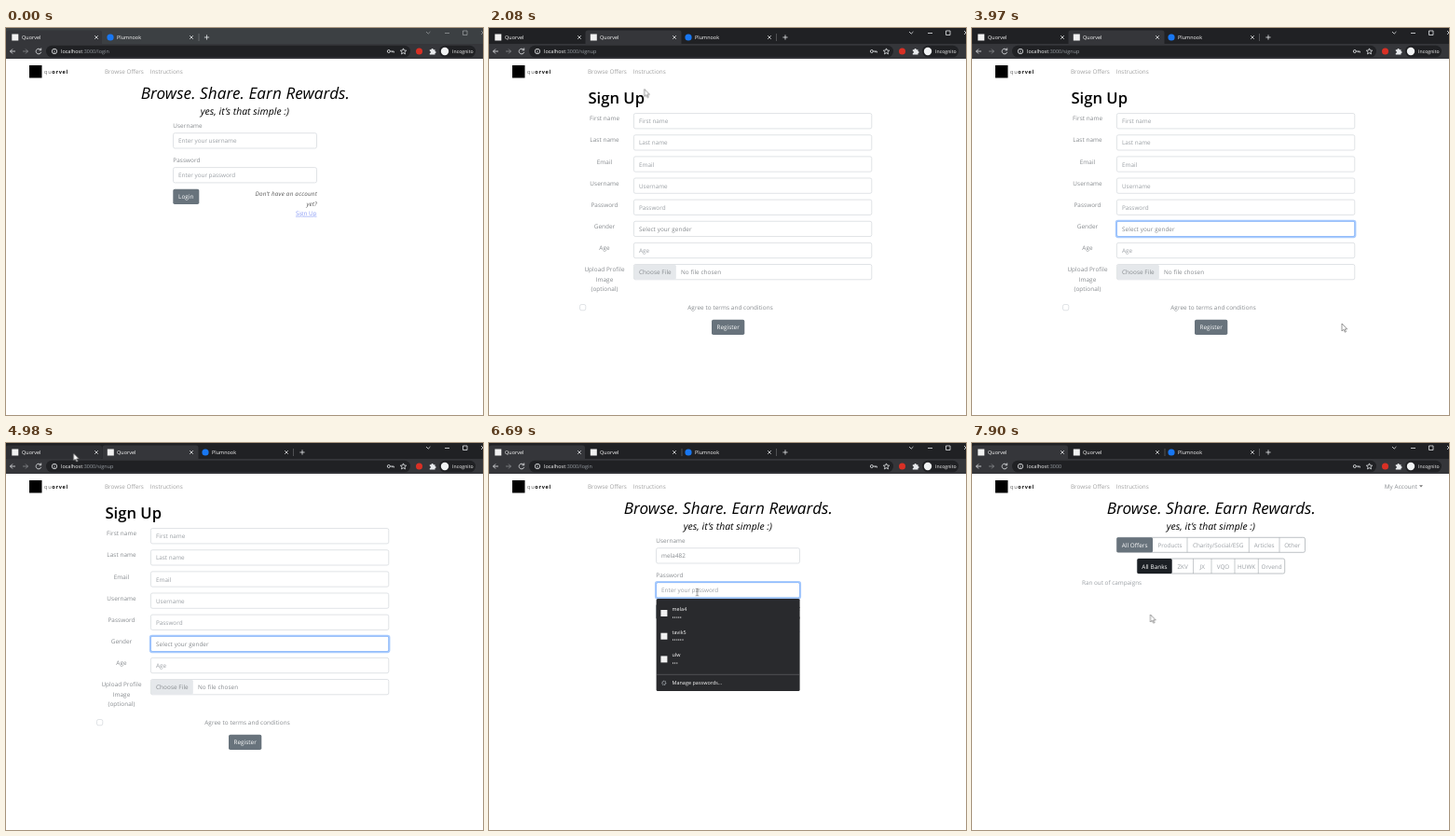
An HTML page that plays this animation: 512x415 px, repeating every 8000 ms.

```html
<!DOCTYPE html>
<html lang="en">
<head>
<meta charset="utf-8">
<title>Sign in walkthrough</title>
<style>
html,body{margin:0;width:100%;height:100%;overflow:hidden;background:#fff}
svg{display:block;width:512px;height:415px;font-family:"Open Sans","Noto Sans",sans-serif;font-size:6.35px;text-rendering:geometricPrecision}
text{white-space:pre}
.lab{fill:#85898d;letter-spacing:.08px}.ph{fill:#9a9fa4}.nav{fill:#a0a0a0}
.w{fill:#fff;font-weight:500;letter-spacing:.06px}
.ui{font-size:5.4px;fill:#fff;font-weight:500;letter-spacing:.06px}.dim{fill:#9aa0a6}
.mid{text-anchor:middle}.end{text-anchor:end}
.it{font-style:italic}
.ask{fill:#555;letter-spacing:.2px}
.h1{font-size:17.1px;font-weight:500;fill:#000;letter-spacing:.1px}
.h2{font-size:10.4px;font-weight:500;fill:#000;letter-spacing:.06px}
.title{font-size:16.6px;font-weight:600;fill:#000}
.box{fill:#fff;stroke:#d3d7db;stroke-width:.7}
.ring{fill:none;stroke:#a9cbfd;stroke-width:2}
.ring+rect{fill:none;stroke:#86b7fe;stroke-width:.7}
.line{fill:none;stroke:#e8eaed;stroke-width:.8}
.cur{fill:#fff;stroke:#555;stroke-width:.6;stroke-linejoin:round}
</style>
</head>
<body>
<svg id="stage" viewBox="0 0 512 415"></svg>
<script>
const LOOP = 8000;
const SITE = 'Quorvel', OTHER = 'Plumnook';

// Times in ms during which each group is shown
const shown = {
  idle: [[0, 910]],
  busy: [[910, 8000]],
  spin: [[910, 1780]],
  loaded: [[1780, 8000]],
  first: [[0, 1780], [5110, 8000]],
  second: [[1780, 5110]],
  tabhover: [[4900, 5110]],
  login: [[0, 1780], [5110, 7660]],
  signup: [[1780, 5110]],
  home: [[7660, 8000]],
  select: [[2860, 5110]],
  options: [[2940, 3470]],
  userfocus: [[5730, 6690]],
  userlist: [[5800, 6210]],
  userempty: [[0, 6210]],
  userfilled: [[6210, 8000]],
  passfocus: [[6690, 7660]],
  passlist: [[6690, 6900]],
  passempty: [[0, 6900]],
  passfilled: [[6900, 8000]],
  caret: [[6900, 7430]],
  press: [[7250, 7660]],
  arrow: [[0, 560], [1000, 1250], [1400, 2300], [2600, 5500], [7150, 7250], [7660, 8000]],
  hand: [[560, 1000], [1250, 1400], [7250, 7660]],
  beam: [[2300, 2600], [5500, 7150]]
};

// Pointer path: time, x, y
const path = [
  [0, 495, 418], [70, 492, 404], [240, 440, 325], [420, 355, 232], [600, 320, 197], [910, 320, 197],
  [1080, 262, 136], [1320, 161, 50], [1380, 160, 45], [1690, 151, 10], [1850, 151, 10],
  [2100, 168, 70], [2540, 204, 177], [2610, 203, 222], [2690, 200, 211.5], [3560, 200, 211.5],
  [3720, 262, 262], [3970, 397, 317], [4220, 397, 317], [4350, 421, 288], [4620, 260, 142],
  [4880, 80, 18], [4980, 72.5, 11], [5350, 72.5, 11], [5560, 209, 115], [6290, 209, 115],
  [6520, 223.5, 160], [7030, 223.5, 160], [7430, 191.5, 184], [8000, 191.5, 184]
];

const pct = t => +(t / LOOP * 100).toFixed(4) + '%';
let css = '';
for (const [name, spans] of Object.entries(shown)) {
  let keys = spans[0][0] ? '0%{opacity:0}' : '';
  for (const [a, b] of spans)
    keys += `${pct(a)}{opacity:1}` + (b < LOOP ? `${pct(b)}{opacity:0}` : '100%{opacity:1}');
  css += `@keyframes ${name}{${keys}}.${name}{animation:${name} ${LOOP}ms step-end infinite}`;
}
css += `@keyframes move{${path.map(([t, x, y]) => `${pct(t)}{transform:translate(${x}px,${y}px)}`).join('')}}`
  + `#pointer{animation:move ${LOOP}ms linear infinite}`;
document.head.appendChild(document.createElement('style')).textContent = css;

const text = (x, y, s, c = '', more = '') => `<text x="${x}" y="${y}" class="${c}" ${more}>${s}</text>`;
const rect = (x, y, w, h, fill, r = 0) => `<rect x="${x}" y="${y}" width="${w}" height="${h}" rx="${r}" fill="${fill}"/>`;
const line = (d, c = 'line', more = '') => `<path d="${d}" class="${c}" ${more}/>`;
const dot = (x, y, r, fill) => `<circle cx="${x}" cy="${y}" r="${r}" fill="${fill}"/>`;
const group = (c, ...parts) => `<g class="${c}">${parts.join('')}</g>`;
const frame = (x, y, w, h, c = 'box') => `<rect x="${x}" y="${y}" width="${w}" height="${h}" rx="1.8" class="${c}"/>`;
const ring = (x, y, w, h) => frame(x - .6, y - .6, w + 1.2, h + 1.2, 'ring') + frame(x, y, w, h, '');
const button = (x, y, w, label, fill = '#68737c') =>
  rect(x, y, w, 16.3, fill, 1.8) + text(x + w / 2, y + 10.6, label, 'w mid');

// Browser window
const cross = x => line(`M${x - 1.8} 8.2l3.6 3.6m0-3.6l-3.6 3.6`);
const plus = x => line(`M${x - 2.6} 10h5.2M${x} 7.4v5.2`);
const split = x => line(`M${x} 6v8`, 'line', 'opacity=".3"');
const tabShape = x => line(`M${x} 17.5V5q0-2.5 2.5-2.5h98q2.5 0 2.5 2.5v12.5z`, '', 'fill="#35363a"');
const tabLabel = (x, icon, name) => icon + text(x + 17, 12, name, 'ui') + cross(x + 97);
const favicon = (x, y) => rect(x, y, 7, 7, '#f1f1f1');
const siteTab = x => tabLabel(x, favicon(x + 6.3, 6.5), SITE);
const otherTab = x => tabLabel(x, dot(x + 10, 10, 3.6, '#1877f2'), OTHER);
const controls = alpha => `<g opacity="${alpha}">` +
  line('M451 4l2.2 2.2L455.4 4M471 5.5h5M490.5 3h4.5v4.5h-4.5zM510 3l4 4m0-4l-4 4') + '</g>';

const strip =
  group('idle', rect(0, 0, 512, 18, '#3c4043'), tabShape(0), siteTab(0), otherTab(102), split(207), plus(215.5), controls(.5)) +
  group('busy',
    rect(0, 0, 512, 18, '#202124'),
    group('first', tabShape(0), split(207)),
    group('tabhover', rect(0, 2.5, 103, 15, '#2e2f33', 2)),
    group('second', tabShape(103.5)),
    siteTab(0),
    group('spin', '<circle cx="112.5" cy="10" r="2.9" fill="none" stroke="#8ab4f8" stroke-width="1.1" stroke-dasharray="13 5"/>'),
    group('loaded', favicon(108.8, 6.5)),
    text(119, 12, SITE, 'ui'), cross(199),
    otherTab(204), split(308.5), plus(318), controls(1));

const toolbar =
  rect(0, 17, 512, 16, '#35363a') +
  line('M10 25H4.5m2.5-2.5L4.5 25l2.5 2.5') +
  line('M18 25h5.5m-2.5-2.5l2.5 2.5l-2.5 2.5', 'line', 'opacity=".45"') +
  line('M37.2 23.3a2.8 2.8 0 1 0 .5 2.5M37.7 21.5v2.3h-2.3') +
  rect(43, 18.7, 391, 12.6, '#202124', 6.3) +
  '<circle cx="52" cy="25" r="2.7" class="line"/>' + line('M52 24.6v2M52 23.2v.6') +
  '<circle cx="410.8" cy="25" r="1.5" class="line"/>' + line('M412.3 25h4v1.5m-1.6-1.5v1.2') +
  line('M426.5 21.9l.9 2.1 2.3.2-1.8 1.5.6 2.2-2-1.2-2 1.2.6-2.2-1.8-1.5 2.3-.2z') +
  dot(443.5, 25, 3.5, '#d93025') +
  line('M454.8 23.2h1.7a1.1 1.1 0 1 1 2.2 0h1.8v1.7a1.1 1.1 0 1 1 0 2.2v1.5h-5.7v-1.6a1.1 1.1 0 1 0 0-2.2z', '', 'fill="#e8eaed"') +
  rect(465, 18.7, 39, 12.6, '#202124', 6.3) + dot(471, 25, 4.2, '#f1f3f4') +
  text(479, 27, 'Incognito', 'ui', 'style="font-size:5.1px"');
const url = p => text(59, 27, `localhost<tspan class="dim">:3000${p}</tspan>`, 'ui');

// Shared page parts
const header =
  rect(25, 40, 13.5, 13.5, '#000') +
  text(41, 49, 'qu<tspan font-weight="700" fill="#111">orvel</tspan>', '', 'fill="#666" font-size="5.6" letter-spacing=".7"') +
  text(106, 48.7, 'Browse Offers', 'nav') + text(154.7, 48.7, 'Instructions', 'nav');
const slogan =
  text(256.8, 76, 'Browse. Share. Earn Rewards.', 'h1 it mid') +
  text(256.4, 93, 'yes, it’s that simple :)', 'h2 it mid');

// Saved accounts popup
const saved = y => `<g transform="translate(0 ${y})">` +
  rect(179.6, 0, 154, 99, '#292a2d', 1.5) +
  [['mela4', 5], ['tavik5', 6], ['ulw', 3]].map(([name, n], i) =>
    favicon(184.4, 12 + i * 24.7) + text(196.5, 13 + i * 24.7, name, 'ui') +
    text(196.5, 21.7 + i * 24.7, '•'.repeat(n), 'ui')).join('') +
  line('M180 81.3h153', 'line', 'opacity=".25"') +
  '<circle cx="187.8" cy="90.3" r="1.9" fill="none" stroke="#9aa0a6" stroke-width="1.3" stroke-dasharray="1 .5"/>' +
  text(196.5, 92.3, 'Manage passwords...', 'ui') + '</g>';

const login = group('login', url('/login'), slogan,
  text(179.3, 106.8, 'Username', 'lab'), frame(179.5, 112.7, 154, 16.3),
  text(179.3, 143.6, 'Password', 'lab'), frame(179.5, 149.6, 154, 16.3),
  group('userempty', text(185, 123.2, 'Enter your username', 'ph')),
  group('userfilled', text(185, 123.2, 'mela482', 'lab')),
  group('passempty', text(185, 160.1, 'Enter your password', 'ph')),
  group('passfilled', Array.from({length: 7}, (_, i) => dot(186 + i * 3.05, 157.7, 1, '#666')).join('')),
  button(179.3, 172.7, 28, 'Login'),
  group('press', button(179.3, 172.7, 28, 'Login', '#565e64')),
  text(334, 180.2, 'Don’t have an account', 'ask it end'),
  text(334, 190.5, 'yet?', 'ask it end'),
  text(333.5, 200.8, 'Sign Up', 'end', 'fill="#8b9cf5" text-decoration="underline"'),
  group('userfocus', ring(179.5, 112.7, 154, 16.3), line('M185.3 117.5v7', '', 'stroke="#555" stroke-width=".6"')),
  group('passfocus', ring(179.5, 149.6, 154, 16.3)),
  group('caret', line('M206.5 154v7', '', 'stroke="#777" stroke-width=".6"')),
  group('userlist', saved(130)), group('passlist', saved(167)));

const rowY = i => 91.6 + i * 23.13;
const fields = ['First name', 'Last name', 'Email', 'Username', 'Password', 'Gender', 'Age'];
const signup = group('signup', url('/signup'),
  text(106.5, 80.5, 'Sign Up', 'title'),
  ...fields.map((name, i) =>
    text(124, rowY(i) + 7.7, name, 'lab mid') + frame(155.4, rowY(i), 255.4, 16.3) +
    text(161, rowY(i) + 10.7, name === 'Gender' ? 'Select your gender' : name, name === 'Gender' ? 'lab' : 'ph')),
  ...['Upload Profile', 'Image', '(optional)'].map((s, i) => text(124, 261.3 + i * 10.2, s, 'lab mid')),
  frame(155.4, rowY(7), 255.4, 16.3), rect(155.8, rowY(7) + .4, 45, 15.5, '#e5e8eb', 1.4),
  text(161, 264.2, 'Choose File', 'lab'), text(206, 264.2, 'No file chosen', 'lab'),
  frame(97.5, 296.5, 6.3, 6.3), text(259, 302.3, 'Agree to terms and conditions', 'lab mid'),
  button(239, 312.8, 35.3, 'Register'),
  group('select', ring(155.4, rowY(5), 255.4, 16.3)),
  group('options',
    '<rect x="155.4" y="223.8" width="255.4" height="55.4" fill="#fff" stroke="#888" stroke-width=".7"/>',
    rect(155.7, 224.1, 254.8, 13.5, '#c5c5c5'),
    text(161, 233.6, 'Select your gender', 'w'),
    ...['Male', 'Female', 'Other'].map((s, i) => text(161, 247.6 + i * 13.7, s, 'lab'))));

// Joined buttons: edges, top, labels, colour
const bar = (xs, y, names, color) => {
  const x0 = xs[0], w = xs[xs.length - 1] - x0;
  return `<rect x="${x0}" y="${y}" width="${w}" height="16" rx="1.8" fill="#fff" stroke="#a3a8ad" stroke-width=".7"/>` +
    rect(x0, y, xs[1] - x0, 16, color, 1.5) +
    names.map((s, i) => (i > 1 ? line(`M${xs[i]} ${y}v16`, '', 'stroke="#a3a8ad" stroke-width=".6"') : '') +
      text((xs[i] + xs[i + 1]) / 2, y + 10.5, s, (i ? 'ph' : 'w') + ' mid')).join('');
};
const home = group('home', url(''), slogan,
  text(442.8, 48.7, 'My Account', 'lab'), line('M480 45.2h4l-2 2.2z', '', 'fill="#777"'),
  bar([155.3, 194, 231, 297.3, 330, 357.5], 101.3, ['All Offers', 'Products', 'Charity/Social/ESG', 'Articles', 'Other'], '#68737c'),
  bar([177.3, 214.7, 237.5, 257, 282, 307.3, 335.7], 124, ['All Banks', 'ZKV', 'JX', 'VQO', 'HUWK', 'Orvend'], '#1b1f24'),
  text(118, 152.2, 'Ran out of campaigns', 'ph'));

const pointer = '<g id="pointer">' +
  group('arrow', line('M0 0v8l1.9-1.7 1.4 2.9 1.2-.6-1.3-2.7h2.5z', 'cur')) +
  group('hand', line('M-.9 .6q.9-1.2 1.8 0v3.2q1.3-.6 1.7.3 1.3-.5 1.6.5 1.2-.2 1.2 1v2.2l-1 2.4h-4.4l-2.7-3.7q0-1.3 1.8.1z', 'cur')) +
  group('beam', line('M-1.5-3.8q1.5 0 1.5.6 0-.6 1.5-.6M0-3.2v6.4M-1.5 3.8q1.5 0 1.5-.6 0 .6 1.5.6', '', 'fill="none" stroke="#555" stroke-width=".7"')) +
  '</g>';

document.getElementById('stage').innerHTML =
  rect(0, 0, 512, 415, '#fff') + strip + toolbar + header + login + signup + home + pointer;
</script>
</body>
</html>
```
